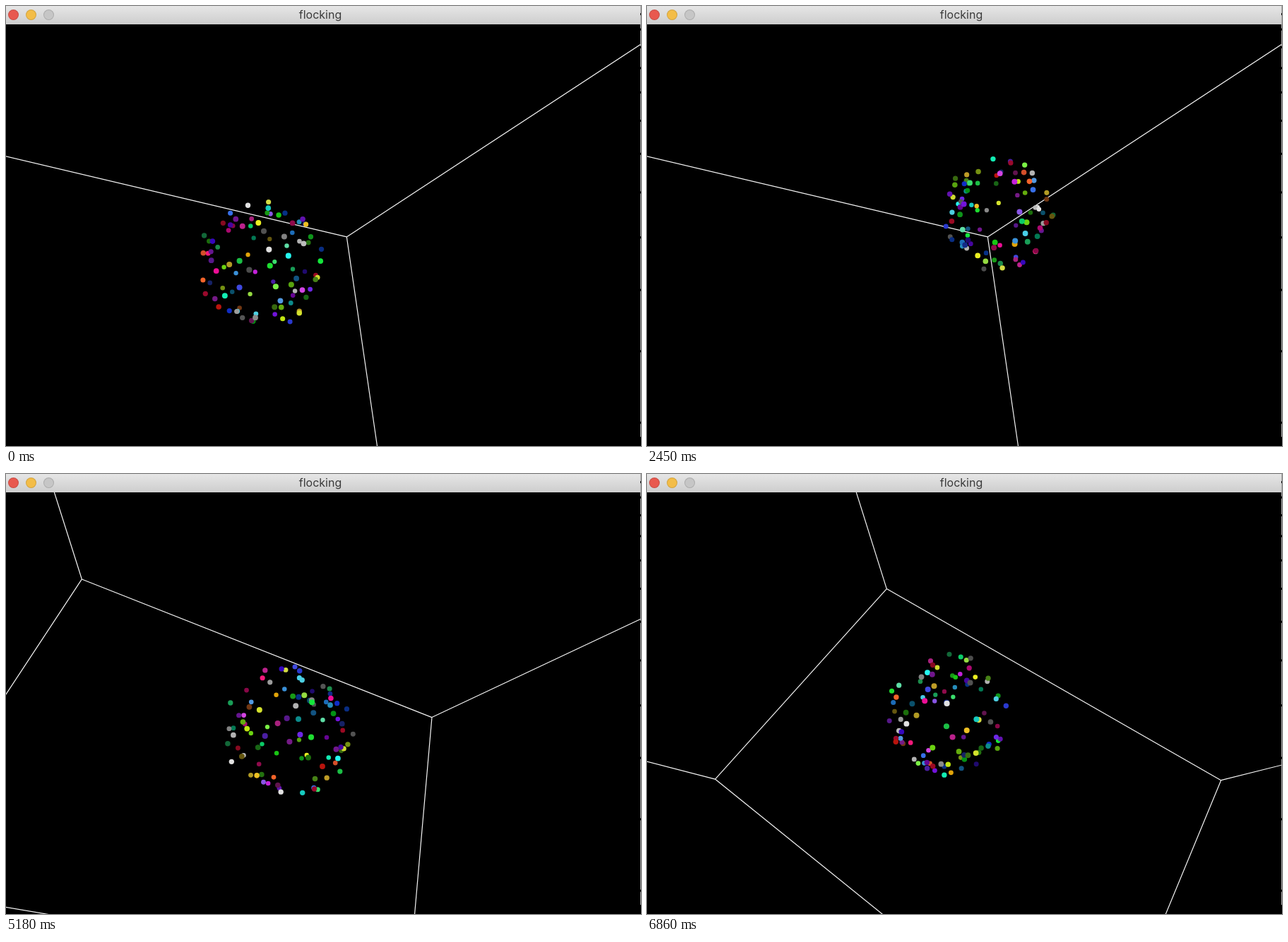
Write an HTML page with a canvas that moves like this. It is 899x623 px and loops after 6930 ms.

```html
<!DOCTYPE html>
<html lang="en">
<head>
<meta charset="utf-8">
<title>flocking</title>
<style>
  html, body { margin: 0; width: 100%; height: 100%; overflow: hidden; background: #000; }
  canvas { position: absolute; left: 0; top: 0; }
  header {
    position: absolute; left: 0; top: 0; width: 898px; height: 26px;
    background: linear-gradient(#e6e6e6, #cdcdcd);
    font: 16px/25px Inter, Roboto, sans-serif; color: #3b3b3b;
  }
  h1 { position: absolute; left: 345px; width: 200px; margin: 0; font: inherit; text-align: center; }
  i {
    position: absolute; top: 4.5px; width: 15px; height: 15px; border-radius: 50%;
    box-sizing: border-box; border: 1px solid #0002;
  }
</style>
</head>
<body>
<canvas id="stage" width="899" height="623"></canvas>
<header>
  <i style="left:2.5px;background:#e8594f"></i>
  <i style="left:27.5px;background:#f3bd48"></i>
  <i style="left:52.5px;background:#c6c6c6"></i>
  <h1>flocking</h1>
</header>
<script>
const ctx = document.getElementById('stage').getContext('2d');
const LOOP = 6930, STEP = 70;
const FOCAL = 518, MID_X = 449, MID_Y = 324;
const HALF_W = 450, HALF_H = 298, HALF_D = 450;
const TURN_START = 3956, TURN_TIME = 2904;

let seed = 29;
const rand = (lo = 0, hi = 1) => {
  seed = seed * 16807 % 2147483647;
  return lo + (hi - lo) * seed / 2147483647;
};

// 1 at the peak time, -1 half a period away
const wave = (t, peak, period) => Math.cos(2 * Math.PI * (t - peak) / period);

function birdColor() {
  if (rand() < .12) return `hsl(0 0% ${rand(30, 92)}%)`;
  return `hsl(${rand(0, 360)} ${rand(65, 95)}% ${rand(22, 62)}%)`;
}

// Each bird circles the shell on its own great circle.
const COUNT = 96;
const birds = Array.from({ length: COUNT }, (_, i) => {
  const z = 1 - 2 * (i + .5) / COUNT;
  const turn = i * 2.39996 + rand(0, .6);
  return {
    home: new DOMPoint(Math.sqrt(1 - z * z) * Math.cos(turn), Math.sqrt(1 - z * z) * Math.sin(turn), z),
    // an axis in the plane across the home direction
    axis: new DOMMatrix().rotate(0, Math.acos(z) * 180 / Math.PI, 0).rotate(0, 0, rand(0, 360))
      .transformPoint(new DOMPoint(1, 0, 0)),
    heading: turn * 180 / Math.PI,
    speed: rand(35, 70),
    reach: rand(.78, 1),
    color: birdColor()
  };
});

function boxPose(p) {
  const [x, y, z] = [.04 - .105 * p, .8 + .04 * p, .45 - .09 * p];
  const angle = p * Math.hypot(x, y, z) * 180 / Math.PI;
  return new DOMMatrix()
    .translate(2 * p, 2, 361 + 53 * (1 - p) ** 2)
    .rotateAxisAngle(x, y, z, angle)
    .rotate(-32.26, -34.05, 12.94);
}

function drawBox(t) {
  const p = Math.max(0, (t - TURN_START) / TURN_TIME);
  const pose = boxPose(p);
  const place = (x, y, z) => pose.transformPoint(new DOMPoint(x, y, z));
  const line = (a, b) => {
    ctx.moveTo(MID_X + a.x / a.z * FOCAL, MID_Y + a.y / a.z * FOCAL);
    ctx.lineTo(MID_X + b.x / b.z * FOCAL, MID_Y + b.y / b.z * FOCAL);
  };
  ctx.beginPath();
  for (let i = 0; i < 4; i++) {
    const x = i % 3 ? HALF_W : -HALF_W, y = i < 2 ? -HALF_H : HALF_H;
    const nextX = i % 2 ? x : -x, nextY = i % 2 ? -y : y;
    const corner = place(x, y, HALF_D);
    line(corner, place(nextX, nextY, HALF_D));
    // stop just in front of the eye
    const length = Math.min(2 * HALF_D, (corner.z - 10) / pose.m33);
    line(corner, place(x, y, HALF_D - length));
  }
  ctx.strokeStyle = '#f4f4f4';
  ctx.lineWidth = 1.2;
  ctx.stroke();
}

function drawFlock(t) {
  const cx = 425 + 65 * wave(t, 2800, 6100) + 35 * t / LOOP;
  const cy = 329 - 45 * wave(t, 3100, 5300);
  const radius = 88 + 7 * wave(t, 0, 5400);
  birds.map(b => {
    const axis = new DOMMatrix().rotate(0, 0, b.heading).transformPoint(b.axis);
    const spot = new DOMMatrix()
      .rotateAxisAngle(axis.x, axis.y, axis.z, b.speed * t / 1000)
      .scale(b.reach).transformPoint(b.home);
    return { spot, color: b.color };
  }).sort((a, b) => a.spot.z - b.spot.z).forEach(({ spot, color }) => {
    ctx.beginPath();
    ctx.arc(cx + spot.x * radius, cy + spot.y * radius, 3.6 + spot.z * .5, 0, 7);
    ctx.fillStyle = color;
    ctx.fill();
  });
}

// Sliver of the window behind
function drawEdge() {
  ctx.fillStyle = '#a9a9a9';
  ctx.fillRect(898, 0, 1, 610);
  ctx.fillStyle = '#000';
  for (let y = 10; y < 600; y += 20 + y / 6) ctx.fillRect(898, y, 1, 3);
}

function frame(now) {
  const t = Math.floor(now % LOOP / STEP) * STEP;
  ctx.fillStyle = '#000';
  ctx.fillRect(0, 0, 899, 623);
  drawBox(t);
  drawFlock(t);
  drawEdge();
  requestAnimationFrame(frame);
}
requestAnimationFrame(frame);
</script>
</body>
</html>
```
